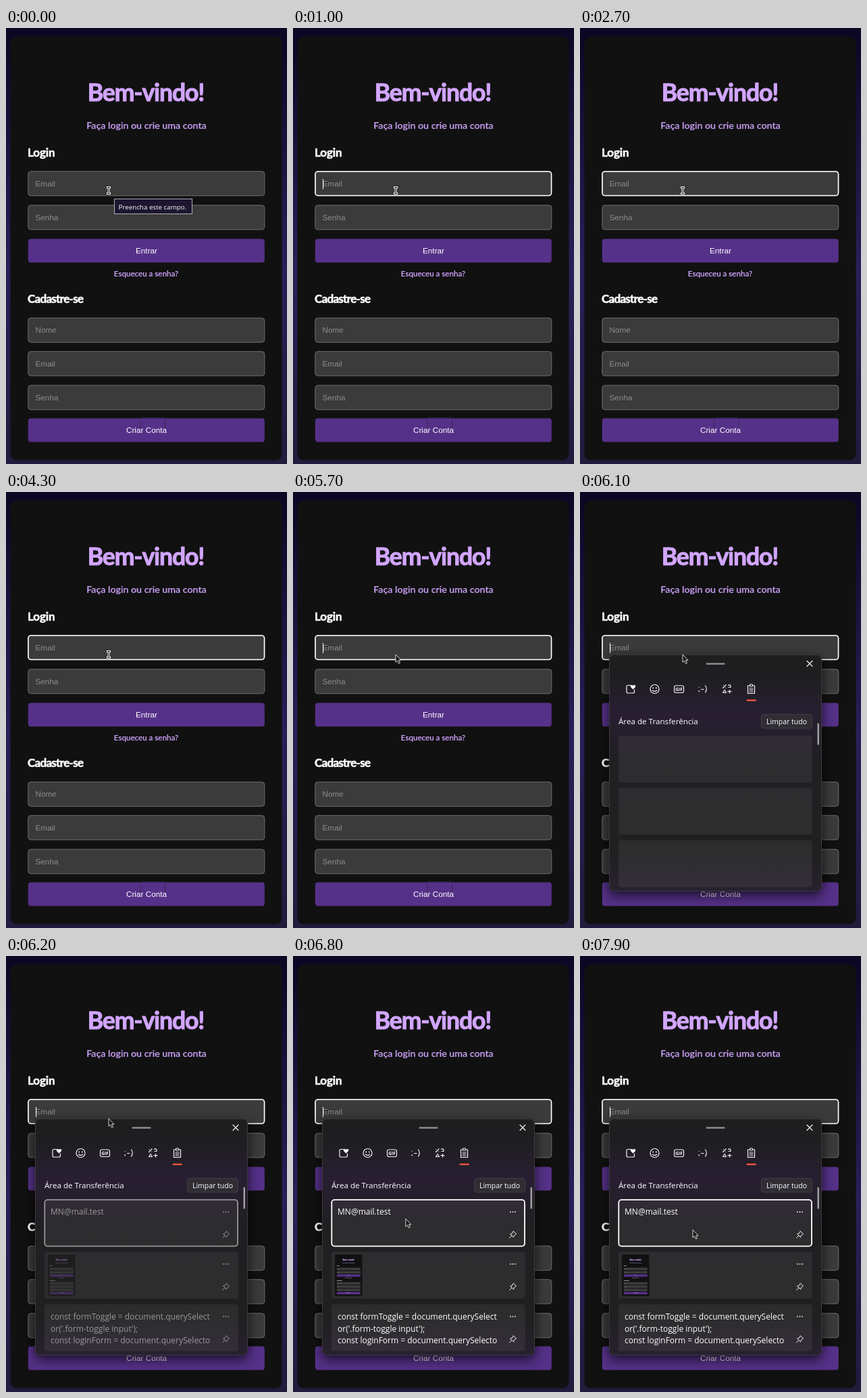
An HTML page for the animation above (8 s loop, 416 px wide and 644 px high).

```html
<!DOCTYPE html>
<html lang="pt-BR">
<head>
<meta charset="utf-8">
<title>Bem-vindo</title>
<style>
  html, body { margin: 0; width: 100%; height: 100%; overflow: hidden; background: #111; }
  svg { display: block; }
  text { white-space: pre; }
  .brand { font-family: Lato, sans-serif; fill: #d2a5ff; }
  .medium { font-weight: 500; stroke: #d2a5ff; stroke-width: .2; }
  .bold { font-weight: 700; }
  .title { stroke: #d2a5ff; stroke-width: 1; }
  .head { font-size: 17px; fill: #fff; stroke: #fff; stroke-width: .6; }
  .control { font: 11.75px "Liberation Sans", Arial, sans-serif; }
  .system { font-family: "Open Sans", "Noto Sans", sans-serif; fill: #fff; }
  .mid { text-anchor: middle; }
  .line { fill: none; stroke: #f2f2f2; stroke-width: 1.2; stroke-linecap: round; stroke-linejoin: round; }
  #popup { filter: drop-shadow(0 6px 9px rgba(0, 0, 0, .7)); }
</style>
</head>
<body>
<svg id="stage" width="416" height="644" viewBox="0 0 416 644"></svg>
<script>
const stage = document.getElementById('stage');

const rect = (x, y, w, h, r, attrs) =>
  `<rect x="${x}" y="${y}" width="${w}" height="${h}" rx="${r}" ${attrs}/>`;
const text = (x, y, str, cls, size, attrs = '') =>
  `<text x="${x}" y="${y}" class="${cls}" ${size ? `font-size="${size}"` : ''} ${attrs}>${str}</text>`;
const input = (y, label) =>
  rect(32.8, y, 350, 36, 4, 'fill="#3b3b3b" stroke="#777" stroke-width=".9"') +
  text(43.5, y + 22, label, 'control', 0, 'fill="#8d8d8d"');
const button = (y, label) =>
  rect(32.8, y, 350, 35, 4, 'fill="#563189"') +
  text(208, y + 21, label, 'control mid', 0, 'fill="#fff"');
const icon = (x, y, body) => `<g class="line" transform="translate(${x} ${y})">${body}</g>`;

const form = `<g id="form">
  ${rect(6.5, 12.5, 402, 626, 9, 'fill="#111"')}
  ${text(207, 107.5, 'Bem-vindo!', 'brand bold title mid', 35.5, 'letter-spacing="-1.1"')}
  ${text(208, 149, 'Faça login ou crie uma conta', 'brand medium mid', 14.25)}
  ${text(32, 190, 'Login', 'brand bold head', 0, 'letter-spacing="-.1"')}
  ${input(211.8, 'Email')}${input(261.8, 'Senha')}${button(311.5, 'Entrar')}
  ${text(207.5, 367, 'Esqueceu a senha?', 'brand medium mid', 11.6)}
  ${text(32, 406, 'Cadastre-se', 'brand bold head', 0, 'letter-spacing="-.7"')}
  ${input(428.3, 'Nome')}${input(477.8, 'Email')}${input(527.8, 'Senha')}${button(576.5, 'Criar Conta')}
</g>`;

const tooltip = `<g id="tooltip">
  ${rect(160.5, 252.5, 115, 22, 0, 'fill="#1d1630" stroke="#b0aeb6"')}
  ${text(166.5, 267.5, 'Preencha este campo.', 'system', 9.8)}
</g>`;

const tabs =
  icon(75, 291, `<path d="M0-5.500H-4Q-6-5.500-6-3.500V4Q-6 6-4 6H3Q5.500 6 5.500 4V1"/>
    <path d="M3.500.500L0-3Q-1-6 2-6L3.500-5L5-6Q8-6 7-3Z" fill="#fff" stroke="none"/>`) +
  icon(110.5, 291, `<circle r="6.500"/><path d="M-3 2Q0 5 3 2"/>
    <path d="M-2.300-1.500v.1M2.300-1.500v.1" stroke-width="2"/>`) +
  icon(146.5, 291, rect(-7, -5, 14, 10.5, 2.5, '') +
    text(0, 2.7, 'GIF', 'system bold mid', 6.5, 'stroke="none"')) +
  icon(182, 291, '<path d="M-5.500-2.500v.1M-5.500 2.500L-6 4M-2.500.500H1M3.500-5Q7 0 3.500 5"/>') +
  icon(217.5, 291, `<path d="M-6-1.500L-1.500-6M-5.500-5.500v.1M-2-2v.1M2-5.500Q4-7 5.500-5V-2.500M2.500-2.500H5.500
    M-6 5.500H-1L-3.500 1.500ZM4 1.500V6M1.500 3.700H6.300"/>`) +
  icon(253.5, 291, `<path d="M-2-5H-5V6.500H5V-5H2"/>${rect(-2, -7, 4, 3, 1, '')}
    <path d="M-2.500-1H2.500M-2.500 1.500H2.500M-2.500 4H2.500"/>`);

const cardTops = [360, 437, 514.5];
const cards = cardTops.map(y => rect(57, y, 286.5, 69, 4, 'fill="#fff" fill-opacity=".058"')).join('');
const cardTools = cardTops.map(y =>
  icon(325.5, y + 18, '<path d="M-3.500 0v.1M0 0v.1M3.500 0v.1" stroke-width="1.800"/>') +
  icon(325.5, y + 51.5, '<path d="M1-5L5-1L2 1L1 4L-4-1L-1-2ZM-1.500 1.500L-5 5" stroke-width="1"/>')
).join('');
const code = ['const formToggle = document.querySelect', "or('.form-toggle input');",
  'const loginForm = document.querySelecto'];

const popup = `<g id="popup">
  ${rect(43.5, 240.5, 314, 349, 7, 'fill="url(#acrylic)" stroke="#3b3a3d"')}
  ${rect(186.5, 252.5, 28, 2.5, 1.2, 'fill="#8d8b90"')}
  ${icon(340, 253.5, '<path d="M-4-4L4 4M4-4L-4 4"/>')}
  ${tabs}
  ${rect(246.5, 306.5, 14.5, 2.5, 1.2, 'fill="#e5523f"')}
  ${text(57, 343, 'Área de Transferência', 'system', 11.65)}
  ${rect(268.5, 328.5, 75, 20.5, 3.5, 'fill="#302d35" stroke="#403d45"')}
  ${text(306, 343, 'Limpar tudo', 'system mid', 10.5)}
  ${rect(351.5, 341.5, 2.5, 32, 1.2, 'fill="#a09fa3"')}
  ${cards}
  <g id="clips">
    ${rect(57.3, 360.2, 285.7, 68.4, 4, 'fill="none" stroke="#fff" stroke-width="1.800"')}
    ${text(66, 382, 'MN@mail.test', 'system', 12)}
    <use href="#form" transform="translate(61.500 439.800) scale(.1 .098)"/>
    ${code.map((line, i) => text(66, 537 + i * 17.7, line, 'system', 12)).join('')}
    ${cardTools}
  </g>
</g>`;

stage.innerHTML = `<defs>
  <linearGradient id="night" x2="0" y2="1">
    <stop stop-color="#0c0624"/><stop offset=".55" stop-color="#2a1f58"/><stop offset="1" stop-color="#211c3e"/>
  </linearGradient>
  <linearGradient id="acrylic" x2="0" y2="1">
    <stop stop-color="#1e1e1f"/><stop offset=".1" stop-color="#1f1e21"/><stop offset=".25" stop-color="#281f32"/>
    <stop offset=".45" stop-color="#201f22"/><stop offset=".85" stop-color="#202021"/><stop offset="1" stop-color="#28212f"/>
  </linearGradient>
  </defs>
  ${rect(0, 0, 416, 644, 0, 'fill="url(#night)"')}
  ${form}
  <path d="M199 590V575.500H235.500V590" fill="none" stroke="#35264b" stroke-opacity=".8"/>
  ${rect(33, 212, 349.5, 35.5, 4, 'id="ring" fill="none" stroke="#fff" stroke-width="1.600"')}
  ${rect(44, 223, 1, 15, 0, 'id="caret" fill="#fff"')}
  ${tooltip}
  ${popup}
  <g id="beam" fill="none">
    <path d="M149 235.500H155M152 234.500V245M149 244.500H155" stroke="#eee" stroke-width="3"/>
    <path d="M150 235.500H154M152 235.500V244.500M150 244.500H154" stroke="#222"/>
  </g>
  <path id="arrow" d="M0 0V11.500L2.600 9.200L4.500 13.500L6.500 12.600L4.600 8.500H8Z" fill="#161616" stroke="#e4e4e4" stroke-width=".9"/>`;

const part = id => document.getElementById(id);
const [ring, caret, tip, panel, clips, beam, arrow] =
  ['ring', 'caret', 'tooltip', 'popup', 'clips', 'beam', 'arrow'].map(part);
const clamp = v => Math.max(0, Math.min(1, v));
const show = (el, amount) => el.setAttribute('opacity', +amount);

// Times at which the text caret turns on and off
const blinks = [[1000, 1700], [2100, 2700], [3200, 3700], [5700, 6300], [6800, 7400], [7900, 8000]];

function draw(t) {
  const focus = clamp((t - 450) / 100);
  show(ring, focus);
  show(tip, 1 - focus);
  show(caret, blinks.some(([on, off]) => t >= on && t < off));
  panel.style.display = t >= 6100 ? '' : 'none';
  show(clips, clamp((t - 6150) / 100));
  show(beam, t < 5700);
  show(arrow, t >= 5700);
  const move = 1 - (1 - clamp((t - 6500) / 500)) ** 2.5;
  arrow.setAttribute('transform', `translate(${152 + 15 * clamp(move * 1.1)} ${240 + 164.5 * move})`);
}

const start = performance.now();
function tick() {
  draw((performance.now() - start) % 8000);
  requestAnimationFrame(tick);
}
tick();
</script>
</body>
</html>
```
